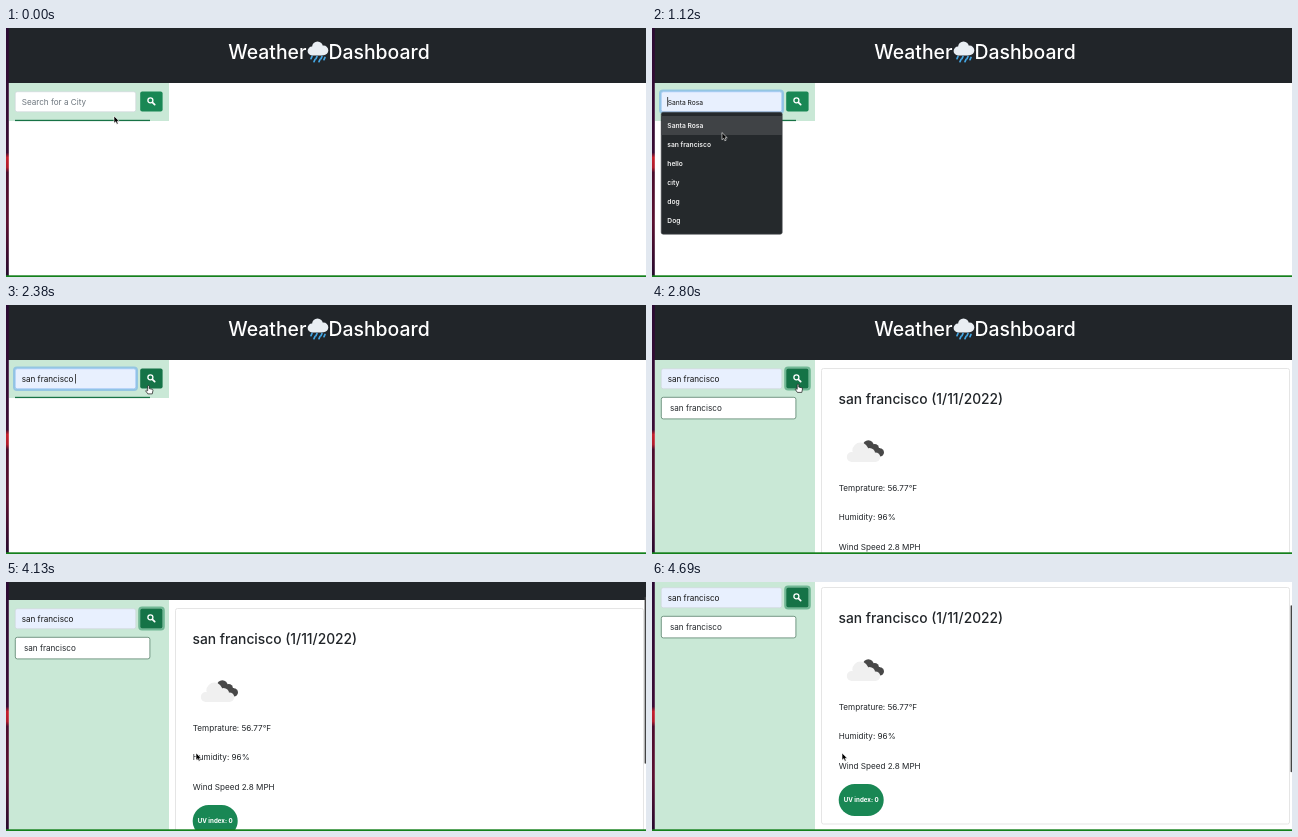
Animation of 640x249 px, one loop 4760 ms. Source, as an HTML page:

```html
<!DOCTYPE html>
<html lang="en">
<head>
<meta charset="utf-8">
<title>Weather Dashboard</title>
<style>
  html, body { margin: 0; width: 100%; height: 100%; overflow: hidden; background: #fff; }
  svg { display: block; width: 640px; height: 249px; }
  text { font: 8.15px Inter, "Open Sans", sans-serif; fill: #212529; white-space: pre; }
  .title { font-size: 19.4px; font-weight: 500; fill: #fff; }
  .city { font-size: 13.8px; font-weight: 500; }
  .menu text { font-size: 6.7px; font-weight: 600; fill: #f1f1f1; }
  .badge { font-size: 6.2px; font-weight: 700; fill: #fff; }
</style>
</head>
<body>
<svg viewBox="0 0 640 249">
  <defs>
    <linearGradient id="desk" x2="0" y2="1">
      <stop offset="0" stop-color="#2b0b33"/>
      <stop offset=".5" stop-color="#3a0c34"/>
      <stop offset=".52" stop-color="#c41f2c"/>
      <stop offset=".56" stop-color="#b01c2c"/>
      <stop offset=".58" stop-color="#4a0d2c"/>
      <stop offset=".78" stop-color="#5a1030"/>
      <stop offset="1" stop-color="#260a2e"/>
    </linearGradient>
  </defs>
  <rect width="640" height="249" fill="#fff"/>

  <g id="page">
    <rect width="640" height="55" fill="#212529"/>
    <text class="title" x="300.5" y="30.5" text-anchor="end">Weather</text>
    <text class="title" x="322.5" y="30.5">Dashboard</text>
    <g fill="#e9eef3">
      <circle cx="306" cy="23" r="4.4"/><circle cx="311.5" cy="18.8" r="5.4"/>
      <circle cx="317.5" cy="22.4" r="4.8"/><rect x="305" y="21" width="13" height="6.4" rx="2"/>
    </g>
    <path d="M306 28.5l-1 2.2M311 28.5l-1 2.2M316 28.5l-1 2.2M309 31.5l-1 2.2M314 31.5l-1 2.2M319 29.5l-1 2.2"
      stroke="#45a9e6" stroke-width="1.7" stroke-linecap="round"/>

    <rect id="aside" x="3" y="55" width="160" height="38" fill="#c9e8d6"/>
    <rect id="glow" x="8" y="62.5" width="123" height="22.5" rx="3" fill="none" stroke="#0d6efd" stroke-opacity=".28" stroke-width="2"/>
    <rect id="input" x="9.25" y="63.75" width="120.5" height="20" rx="2" fill="#fff" stroke="#ced4da" stroke-width=".6"/>
    <text id="value" x="15.7" y="76.6"></text>
    <rect id="caret" y="69" width=".8" height="9.5" fill="#222"/>
    <rect id="ring" x="133.2" y="62.4" width="24.6" height="22.2" rx="3" fill="none" stroke="#198754" stroke-opacity=".5" stroke-width="2"/>
    <rect id="button" x="134.2" y="63.6" width="22.4" height="19.9" rx="2"/>
    <path d="M146.6 74.6l2.1 2.1" stroke="#fff" stroke-width="1.7" stroke-linecap="round"/>
    <circle cx="144.4" cy="72.3" r="2.5" fill="none" stroke="#fff" stroke-width="1.3"/>

    <rect id="line" x="9" y="91.8" width="135" height="1.3" fill="#177245"/>
    <g id="history">
      <rect x="9.3" y="92.3" width="134.6" height="21.6" rx="2" fill="#fff" stroke="#57816a" stroke-width=".8"/>
      <text x="18" y="106">san francisco</text>
    </g>

    <g id="card">
      <rect x="169.5" y="63.5" width="468" height="236.5" rx="2" fill="#fff" stroke="#dfdfdf" stroke-width=".8"/>
      <text class="city" x="186.5" y="99.3">san francisco (1/11/2022)</text>
      <g fill="#484848">
        <circle cx="216.3" cy="140.6" r="5.4"/><circle cx="222.6" cy="143.4" r="4.4"/>
        <circle cx="227.8" cy="147.4" r="4.2"/><rect x="214" y="143" width="14" height="8.6"/>
      </g>
      <g fill="#f0f0f0">
        <circle cx="199.8" cy="152" r="5"/><circle cx="208.4" cy="145.6" r="8"/>
        <circle cx="217.5" cy="148.5" r="5.6"/><circle cx="223.4" cy="152.2" r="4.8"/>
        <rect x="199" y="148" width="25" height="9"/>
      </g>
      <text x="186.7" y="186">Temprature: 56.77°F</text>
      <text x="186.7" y="215.4">Humidity: 96%</text>
      <text x="186.7" y="244.8">Wind Speed 2.8 MPH</text>
      <rect x="186.7" y="260" width="45" height="32" rx="16" fill="#198754"/>
      <text class="badge" x="209.2" y="278.2" text-anchor="middle">UV index: 0</text>
    </g>

    <g id="menu" class="menu">
      <rect x="9.2" y="84.2" width="121" height="122" rx="2" fill="#25292c" stroke="#4a4e51" stroke-width=".6"/>
      <rect id="hover" x="9.5" width="120.4" height="19" fill="#404346"/>
    </g>
  </g>

  <rect id="thumb" x="638.6" width="1.4" height="167" rx=".7" fill="#444"/>
  <rect width="2.8" height="249" fill="url(#desk)"/>
  <rect y="247.3" width="640" height="1.7" fill="#14801c"/>

  <circle id="click" fill="none" stroke="#8b8b8b" stroke-width="1.2"/>
  <g id="cursor" stroke-linejoin="round">
    <path id="arrow" d="M0 0V7.2L1.7 5.7L2.9 8.2L4.2 7.6L3.1 5.2H5.3Z" fill="#000" stroke="#fff" stroke-width=".6"/>
    <path id="beam" d="M-1.8 -4.2Q0 -4.2 0 -3Q0 -4.2 1.8 -4.2M0 -3V3M-1.8 4.2Q0 4.2 0 3Q0 4.2 1.8 4.2M-1 .8H1" fill="none" stroke="#111" stroke-width=".9"/>
    <path id="hand" d="M-.8 .6Q0 -.6 .8 .6V3.1L3.8 3.8Q4.6 4 4.5 5L3.8 8.4H-.6L-2.8 5.3Q-2.4 4.2 -.8 5.3Z" fill="#fff" stroke="#111" stroke-width=".7"/>
  </g>
</svg>
<script>
const LOOP = 4760, STEP = 70;
const OPEN = 420, PICK = 1750, SEARCH = 2590, RESULT = 2730;
const clicks = [280, 1610, SEARCH];
const cities = ["Santa Rosa", "san francisco", "hello", "city", "dog", "Dog"];
const moves = [
  [0, 108, 88], [350, 87, 74.8], [840, 87, 74.8], [1260, 64, 115], [1400, 64, 115],
  [1680, 63.5, 113.5], [1890, 63.5, 113.5], [2450, 146, 79], [3010, 146, 79], [3360, 190, 171]
];
const scrolls = [
  [3640, 0], [3710, .8], [3780, 2.2], [3850, 4.8], [3990, 18],
  [4130, 37], [4270, 48], [4410, 54.5], [4550, 57.2], [4690, 58]
];

const $ = id => document.getElementById(id);
const set = (id, attrs) => { for (const k in attrs) $(id).setAttribute(k, attrs[k]); };
const show = (id, on) => { $(id).style.display = on ? "" : "none"; };
const linear = u => u;
const smooth = u => u * u * (3 - 2 * u);

// Interpolates rows of [time, ...values]
function at(keys, t, ease) {
  const i = keys.findIndex(k => k[0] > t);
  if (i < 0) return keys[keys.length - 1].slice(1);
  if (i === 0) return keys[0].slice(1);
  const a = keys[i - 1], b = keys[i], u = ease((t - a[0]) / (b[0] - a[0]));
  return a.slice(1).map((v, j) => v + (b[j + 1] - v) * u);
}

cities.forEach((city, i) => {
  const text = document.createElementNS("http://www.w3.org/2000/svg", "text");
  text.textContent = city;
  text.setAttribute("x", 15.3);
  text.setAttribute("y", 100.4 + i * 19);
  $("menu").append(text);
});

function draw(t) {
  const [x, y] = at(moves, t, smooth);
  const [scroll] = at(scrolls, t, linear);
  const overInput = x > 9 && x < 130 && y > 64 && y < 84;
  const overButton = x > 134 && x < 157 && y > 63 && y < 84;

  const open = t >= OPEN && t < PICK;
  const row = open && x < 130 ? Math.floor((y - 88.5) / 19) : -1;
  const picked = t >= PICK, filled = picked || row >= 0;
  const focused = t >= 350 && t < SEARCH, searched = t >= SEARCH;

  set("page", { transform: `translate(0 ${-scroll})` });
  set("input", { fill: filled ? "#e8f0fe" : "#fff", stroke: focused ? "#86b7fe" : "#ced4da" });
  show("glow", focused);
  const value = $("value");
  value.textContent = picked ? cities[1] : row >= 0 ? cities[row] : "Search for a City";
  value.style.fill = filled ? "#111" : "#6c757d";
  value.style.fontSize = picked || !filled ? "" : "6.7px";
  show("caret", focused);
  set("caret", { x: picked ? 69 : 15.3 });

  show("menu", open);
  show("hover", row >= 0);
  set("hover", { y: 88.5 + Math.max(row, 0) * 19 - .5 });

  show("ring", searched);
  set("button", { fill: searched || overButton ? "#157347" : "#198754" });
  const result = t >= RESULT;
  show("history", result);
  show("line", !result);
  show("card", result);
  set("aside", { height: result ? 260 : 38 });

  show("thumb", scroll > 0);
  set("thumb", { y: scroll * .4 });

  set("cursor", { transform: `translate(${x} ${y})` });
  show("beam", overInput);
  show("hand", overButton);
  show("arrow", !overInput && !overButton);

  const start = clicks.find(c => t >= c && t < c + 210);
  show("click", start !== undefined);
  if (start !== undefined) {
    const u = (t - start) / 210;
    set("click", { cx: x, cy: y, r: 8 + 12 * u, opacity: 1 - u * .8 });
  }
}

function tick() {
  const t = performance.now() % LOOP;
  draw(Math.floor(t / STEP) * STEP);
  requestAnimationFrame(tick);
}
tick();
</script>
</body>
</html>
```
